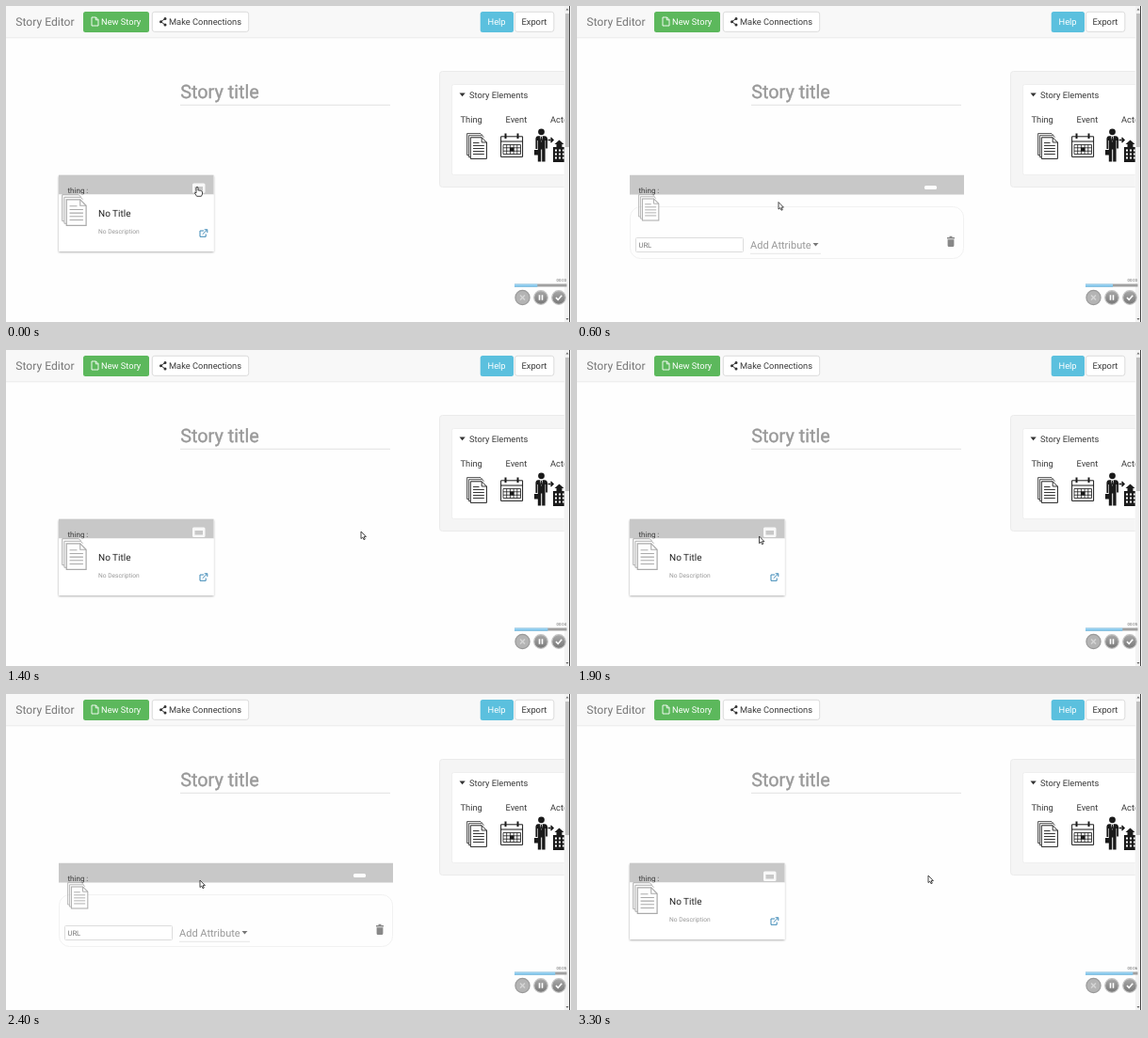
Animation, 600 px wide and 336 px high, one loop 3400 ms. Source, as an HTML page:

```html
<!DOCTYPE html>
<html lang="en">
<head>
<meta charset="utf-8">
<title>Story Editor</title>
<style>
html, body { margin: 0; width: 100%; height: 100%; overflow: hidden; background: #fefefe; }
svg { display: block; }
text { font-family: Roboto, Arial, sans-serif; font-size: 9.3px; fill: #3a3a3a; text-rendering: geometricPrecision; }
.line { fill: none; stroke: currentColor; }
</style>
</head>
<body>
<svg width="600" height="336" viewBox="0 0 600 336">
  <defs>
    <g id="pages" class="line">
      <path stroke-width=".8" d="M2.3 23.5H.6V.6H15L17 2.6M4.3 25.6H2.4V2.7H16.5L18.5 4.6"/>
      <path fill="#fefefe" d="M4.3 4.8H16.2L21.4 10V27.4H4.3Z"/>
      <path stroke-width=".9" d="M16.2 4.8V10H21.4M7 10.5H13.5M7 13.5H18.8M7 16.5H18.8M7 19.5H18.8M7 22.5H18.8"/>
    </g>
    <linearGradient id="blue" x2="0" y2="1">
      <stop stop-color="#b4def5"/><stop offset="1" stop-color="#6bbce8"/>
    </linearGradient>
    <linearGradient id="grey" x2="0" y2="1">
      <stop stop-color="#aaa"/><stop offset="1" stop-color="#777"/>
    </linearGradient>
    <filter id="shadow" x="-10%" y="-10%" width="120%" height="130%">
      <feDropShadow dx="0" dy="1" stdDeviation=".8" flood-opacity=".35"/>
    </filter>
    <clipPath id="page"><path d="M0 0H592.7V336H0Z"/></clipPath>
  </defs>

  <g clip-path="url(#page)">
    <!-- toolbar -->
    <path fill="#f8f8f8" d="M0 0H594V34H0Z"/>
    <path stroke="#ebebeb" d="M0 33.8H594"/>
    <text x="10.3" y="21" style="font-size:12.1px;fill:#777">Story Editor</text>
    <rect x="82" y="6" width="70" height="22" rx="2.5" fill="#5cb85c"/>
    <path class="line" color="#fff" stroke-width=".9" d="M91 12H95.5L98 14.5V21H91ZM95.3 12V14.8H98"/>
    <text x="101" y="20" style="fill:#fff">New Story</text>
    <rect x="155.3" y="6.3" width="102.4" height="21" rx="2.5" fill="#fff" stroke="#d4d4d4" stroke-width=".8"/>
    <path class="line" color="#333" d="M169 13.5L164.5 16.7L169 20"/>
    <path stroke="#333" stroke-width="3" stroke-linecap="round" d="M169 13.5h.01M164.5 16.7h.01M169 20h.01"/>
    <text x="173" y="20">Make Connections</text>
    <rect x="503.7" y="6" width="35.3" height="22" rx="2.5" fill="#5bc0de"/>
    <text x="511.5" y="20" style="fill:#fff">Help</text>
    <rect x="540.5" y="6.3" width="41.3" height="21" rx="2.5" fill="#fff" stroke="#d4d4d4" stroke-width=".8"/>
    <text x="547.5" y="20">Export</text>

    <text x="185.3" y="98" style="font-size:19.8px;fill:#999;stroke:#999;stroke-width:.4px">Story title</text>
    <path stroke="#e2e2e2" d="M185 105.3H408"/>

    <!-- elements panel -->
    <rect x="460.5" y="69.5" width="150" height="123" rx="3" fill="#f5f5f5" stroke="#ebebeb"/>
    <rect x="473.5" y="83.5" width="140" height="96" rx="2" fill="#fff" stroke="#efefef"/>
    <path fill="#333" d="M481.5 92.5h6.2l-3.1 3.8Z"/>
    <text x="492" y="97.8">Story Elements</text>
    <text x="482.5" y="123.8">Thing</text>
    <text x="530.5" y="123.8">Event</text>
    <text x="578" y="123.8">Actor</text>
    <use href="#pages" x="489" y="135" color="#222"/>
    <g color="#1a1a1a">
      <path class="line" d="M525.6 138.8H548.6V160.4H525.6ZM525.6 144H548.6"/>
      <path class="line" stroke-width="2" d="M530.5 135.5V141M543.5 135.5V141"/>
      <path class="line" stroke-width=".8" d="M528 147.5H546.5V157.5H528ZM528 150.8H546.5M528 154.2H546.5M531.7 147.5V157.5M535.4 147.5V157.5M539.1 147.5V157.5M542.8 147.5V157.5"/>
      <path fill="currentColor" d="M535 150.5h4.3v4H535z"/>
      <circle cx="568.5" cy="133.8" r="3.4" fill="currentColor"/>
      <path fill="currentColor" d="M565 138.2H572Q575 138.5 575 141.5V151.5H573.2V143H572.6V165.5H569.2V152.5H568.2V165.5H564.8V143H564.2V152H562.4V141.5Q562.4 138.5 565 138.2Z"/>
      <path fill="currentColor" d="M561 153H566.5V158.5H561Z"/>
      <path fill="#fff" d="M567 138.2H570L568.5 145Z"/>
      <path stroke="currentColor" d="M568.5 139V143.5"/>
      <path class="line" stroke-width="1.5" d="M575.5 142.5H580.5M578.5 140L581 142.5L578.5 145"/>
      <path fill="currentColor" d="M581 150H584.5V147H582.5L587.5 142.5L592.5 147H590.5V150H600V166H581Z"/>
      <path stroke="#fff" stroke-width="2" stroke-dasharray="2 2" d="M583 153.5H600M583 157.5H600M583 161.5H600"/>
    </g>

    <!-- collapsed card -->
    <g id="closed">
      <path filter="url(#shadow)" fill="#fff" d="M56 180H220.5V260.7H56Z"/>
      <path fill="#c8c8c8" d="M56 179.7H220.5V200.5H56Z"/>
      <text x="65.5" y="198.8" style="font-size:8px">thing :</text>
      <path fill="#fff" d="M56 200.5H220.5V260.7H56Z"/>
      <rect x="198" y="188.5" width="13.5" height="10.5" rx="1.5" fill="#f8f8f8"/>
      <path fill="#c8c8c8" d="M200.5 192H209V196.5H200.5Z"/>
      <use href="#pages" color="#aaa" transform="translate(59 200)scale(1.22)"/>
      <text x="98" y="223.8" style="font-size:10px;fill:#222">No Title</text>
      <text x="98" y="242" style="font-size:6.65px;fill:#999">No Description</text>
      <path class="line" color="#3a87b5" d="M210 239H206V245.3H212.2V242.5M208.7 242.8L213.5 238M210.7 237.8H213.8V241"/>
    </g>

    <!-- expanded card -->
    <g id="open">
      <rect x="56.5" y="213.5" width="354" height="55" rx="11" fill="#fefefe" stroke="#f1f1f1"/>
      <path fill="#c8c8c8" d="M56 179.7H411V200.5H56Z"/>
      <text x="65.5" y="198.8" style="font-size:8px">thing :</text>
      <rect x="369" y="191" width="13" height="4" rx="1.5" fill="#fff"/>
      <use href="#pages" color="#aaa" transform="translate(65 200)scale(1.02)"/>
      <rect x="62.5" y="246.5" width="114" height="15" rx="1" fill="#fff" stroke="#dcdcdc"/>
      <text x="65.5" y="257" style="font-size:7.6px;fill:#777">URL</text>
      <text x="184" y="257.5" style="font-size:11px;fill:#999">Add Attribute</text>
      <path fill="#777" d="M250.5 252h6l-3 3.4Z"/>
      <path stroke="#e6e6e6" d="M184 263.3H259"/>
      <path fill="#888" d="M393 246H395.5V244.8H398.5V246H401V247.5H393ZM393.6 248.3H400.4V254.5Q400.4 256 399 256H395Q393.6 256 393.6 254.5Z"/>
    </g>
    <g id="tip">
      <rect x="357" y="205.5" width="37" height="11" rx="1" fill="#666"/>
      <text x="375.5" y="212.7" text-anchor="middle" style="font-size:4.7px;fill:#fff">exit edit mode</text>
    </g>
  </g>

  <!-- scrollbar -->
  <path fill="#f3f3f3" d="M593 0H598V336H593Z"/>
  <path fill="#c1c1c1" d="M594 8H598V150H594Z"/>
  <path fill="#666" d="M594.5 4.5h3l-1.5-2ZM594.5 332h3l-1.5 2Z"/>
  <path fill="#444" d="M598 0H599V336H598Z"/>

  <!-- recorder controls -->
  <text id="clock" x="595" y="293" text-anchor="end" style="font-size:4.2px;fill:#666"></text>
  <path fill="#a0a0a0" d="M540 295.5H595.5V298.5H540Z"/>
  <rect id="bar" x="540" y="295.3" height="3.4" fill="url(#blue)"/>
  <g fill="url(#grey)" stroke="#c4c4c4" stroke-width="1.2">
    <circle cx="548.5" cy="310" r="7.6" fill="#b4b4b4" stroke="#999"/>
    <circle cx="568" cy="310" r="7.3"/><circle cx="587" cy="310" r="7.3"/>
  </g>
  <path class="line" color="#d4d4d4" stroke-width="1.6" d="M546 307.5L551 312.5M551 307.5L546 312.5"/>
  <path class="line" color="#fff" stroke-width="1.6" d="M566.5 307.2V312.8M569.5 307.2V312.8M584 310L586.2 312.4L590.2 307.8"/>

  <g id="cursor" stroke-linejoin="round">
    <path id="arrow" fill="#fff" stroke="#333" stroke-width=".9" d="M0 0V7.6L1.8 6.1L3 8.7L4.3 8.1L3.1 5.6H5.4Z"/>
    <path id="hand" fill="#fff" stroke="#333" stroke-width=".9" d="M-1 2Q0 .4 1 2V5.2Q2 4.2 2.8 5.4Q3.8 4.6 4.3 5.9Q5.4 5.4 5.5 6.8V9L4.4 11.3H-.4L-2.8 7.6Q-2.6 6.4-1 7.8Z"/>
  </g>
</svg>
<script>
const LOOP = 3400, STEP = 100;
// pointer path: time, x, y
const path = [
  [0, 203, 191], [300, 203, 192], [500, 214, 208], [700, 214, 209],
  [1000, 377, 193], [1400, 377, 193], [1700, 202, 197], [1900, 193.5, 198],
  [2100, 204, 194], [2400, 206, 198], [2500, 210, 199], [2800, 350, 201],
  [2900, 368, 199], [3000, 374, 193], [3100, 373, 193], [3400, 373, 193]
];
const get = id => document.getElementById(id);
const show = (id, on) => get(id).setAttribute("display", on ? "inline" : "none");
const inside = (v, a, b) => v >= a && v < b;

function pointer(t) {
  const i = path.findIndex(p => p[0] > t);
  const [t0, x0, y0] = path[i - 1], [t1, x1, y1] = path[i];
  const u = (t - t0) / (t1 - t0), e = u * u * (3 - 2 * u);
  return [x0 + (x1 - x0) * e, y0 + (y1 - y0) * e];
}

function draw(now) {
  const t = Math.floor(now % LOOP / STEP) * STEP;
  const [x, y] = pointer(t);
  const open = inside(t, 300, 1400) || inside(t, 2200, 3100);
  const hover = open
    ? inside(x, 368, 383) && inside(y, 190, 196)
    : inside(x, 197, 212) && inside(y, 187, 200);
  show("open", open);
  show("closed", !open);
  show("tip", open && hover);
  show("hand", hover);
  show("arrow", !hover);
  get("cursor").setAttribute("transform", `translate(${x} ${y})`);
  get("bar").setAttribute("width", 24.3 + t * 0.0079);
  get("clock").textContent = "00:0" + Math.floor(3.1 + t / 1000);
  requestAnimationFrame(draw);
}
requestAnimationFrame(draw);
</script>
</body>
</html>
```
